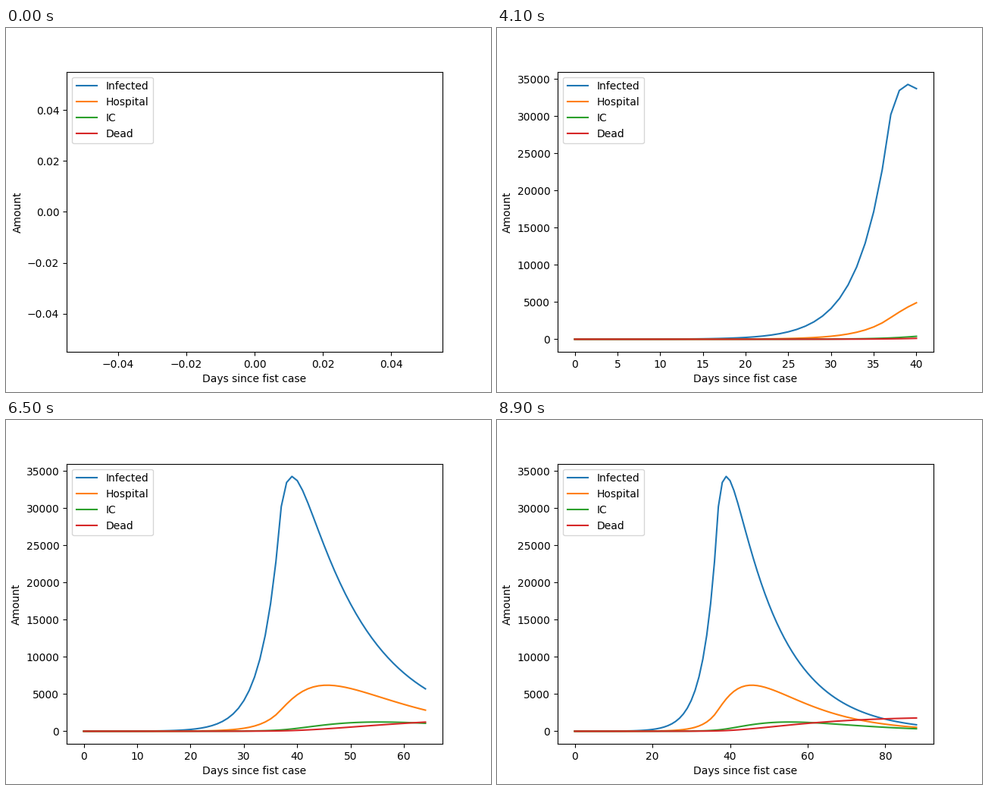
Animation, 640 px wide and 480 px high, one loop 9 s. Source, as a matplotlib script:

```python
import numpy as np
import matplotlib.pyplot as plt
from matplotlib.animation import FuncAnimation

FRAMES = 90
POPULATION = 51140
LABELS = ["Infected", "Hospital", "IC", "Dead"]


def simulate(days):
    """Daily counts of infected, hospitalised, intensive care and dead."""
    infected, hospital, care, dead = 1.0, 0.0, 0.0, 0.0
    carriers, healthy = 1.0, POPULATION - 1.0
    rows = []
    for _ in range(days):
        rows.append((infected, hospital, care, dead))
        # spread is limited by the carriers first, later by who is left
        new = min(0.3249 * carriers, 0.395 * healthy)
        carriers *= 1.3296
        healthy -= new
        dead += 0.0043 * hospital + 0.0245 * care
        care += 0.026 * hospital - 0.1 * care
        hospital += 0.0302 * infected + 0.0329 * new - 0.122 * hospital
        infected += new - 0.0755 * infected
    return np.array(rows)


data = simulate(FRAMES)
fig, ax = plt.subplots(figsize=(6.4, 4.8), dpi=100)


def draw(days):
    ax.clear()
    for values, label in zip(data[:days].T, LABELS):
        ax.plot(np.arange(days), values, label=label)
    ax.set_xlabel("Days since fist case")
    ax.set_ylabel("Amount")
    ax.legend(loc="upper left")
    return ax.lines


anim = FuncAnimation(fig, draw, frames=FRAMES, interval=100,
                     repeat=True, repeat_delay=0)
plt.show()
```
